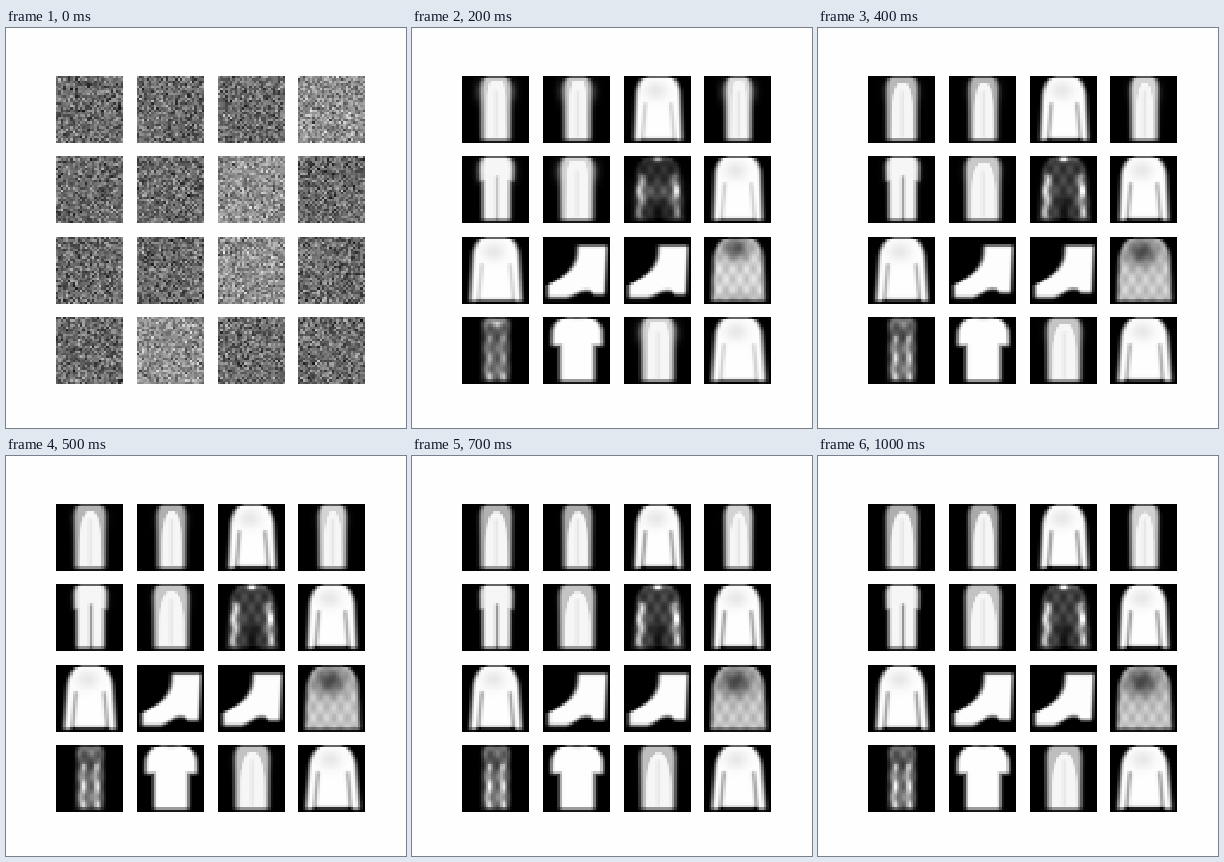
An HTML page with a canvas that plays this animation: 400x400 px, repeating every 1100 ms.

```html
<!DOCTYPE html>
<html lang="en">
<head>
<meta charset="utf-8">
<title>Garment grid</title>
<style>
html, body { margin: 0; width: 100%; height: 100%; overflow: hidden; background: #fefefe; }
canvas { display: block; width: 400px; height: 400px; }
</style>
</head>
<body>
<canvas id="stage" width="400" height="400"></canvas>
<script>
const N = 28, SIZE = 67, PITCH = 80.6, LEFT = 50, TOP = 47.6;
const STEP = 100, STEPS = 11;
const ctx = document.getElementById('stage').getContext('2d');
const tile = document.createElement('canvas');
tile.width = tile.height = N;
const tctx = tile.getContext('2d');
const img = tctx.createImageData(N, N);
const grid = new Float32Array(N * N);
let u = 0; // 0: first rough shapes, 1: settled shapes

const clamp = (v, a, b) => Math.max(a, Math.min(b, v));
const smooth = v => { v = clamp(v, 0, 1); return v * v * (3 - 2 * v); };
const ease = (a, b) => a + (b - a) * u;
const edge = (d, soft) => smooth(d / soft + 0.5);

function random(seed) {
  return () => {
    seed = (seed + 0x6D2B79F5) | 0;
    let t = Math.imul(seed ^ (seed >>> 15), 1 | seed);
    t = (t + Math.imul(t ^ (t >>> 7), 61 | t)) ^ t;
    return ((t ^ (t >>> 14)) >>> 0) / 4294967296;
  };
}

function paint(f) {
  for (let y = 0; y < N; y++)
    for (let x = 0; x < N; x++) {
      const i = y * N + x;
      grid[i] = f(x + 0.5, y + 0.5, grid[i]);
    }
}

const softness = () => ease(4, 3.2);

// Upright shape around x = c: round shoulders, then straight sides to the hem.
function cloth(c, { neck, side, hem, round, level, top = 0.6, end = 26.7 }) {
  paint((x, y, v) => {
    const t = clamp((y - top) / round, 0, 1);
    const full = side + (hem - side) * clamp(y / N, 0, 1);
    const half = neck + (full - neck) * Math.sqrt(1 - (1 - t) ** 2);
    const cover = edge(half - Math.abs(x - c), softness()) * edge(y - top, 1.6) * edge(end - y, 2.6);
    return Math.max(v, level * cover);
  });
}

function spot(x0, y0, rx, ry, level) {
  paint((x, y, v) => v + level * Math.exp(-(((x - x0) / rx) ** 2) - ((y - y0) / ry) ** 2));
}

function line(x0, y0, x1, y1, w, level) {
  const dx = x1 - x0, dy = y1 - y0;
  paint((x, y, v) => {
    const k = clamp(((x - x0) * dx + (y - y0) * dy) / (dx * dx + dy * dy), 0, 1);
    const d = Math.hypot(x - x0 - k * dx, y - y0 - k * dy) / w;
    return v + level * Math.exp(-d * d);
  });
}

function pair(f, c, gap) {
  f(c - gap, -1);
  f(c + gap, 1);
}

function mottle(phase, amount) {
  paint((x, y, v) => v * (1 + amount * Math.sin(x * 1.1 + phase) * Math.sin(y * 0.7 + phase * 2)));
}

function halo(c, gap) {
  pair(x => spot(x, 6.5, 2, 4.5, 60 * (1 - u)), c, gap);
}

// Grey outer cloth with a bright arched core.
function dress(c, w, grey) {
  const half = w - 0.8 * (1 - u);
  cloth(c, { neck: half - 2, side: half, hem: half - 0.2, round: 5, level: ease(225, grey) });
  cloth(c + 0.2, { neck: ease(half - 2, 1), side: half - 1.3, hem: half - 1, round: ease(4, 14), level: 246, top: ease(0.6, 3) });
  line(c, 7, c, 25, 0.8, -16);
  halo(c, w + 0.6);
}

function trousers(c) {
  cloth(c, { neck: 5, side: 5.9, hem: 5.8, round: 3, level: 246 });
  cloth(c, { neck: 5, side: 7, hem: 6.4, round: 4, level: 235, end: 11 });
  line(c + 0.2, 9, c + 0.2, 26, 0.8, ease(-15, -100));
  halo(c, 7.4);
}

function sweater(c, shoulder, hem) {
  const w = shoulder - 0.5 * u, gap = hem * 0.64;
  cloth(c, { neck: ease(6, 4), side: w, hem, round: ease(6, 9), level: 254 });
  pair((x, s) => line(x - s, 12, x + s * 0.3, 27, 0.9, ease(-8, -90)), c, gap);
  line(c - gap + 1, 27.3, c + gap - 1, 27.3, 1.4, -170 * u);
  spot(c - 1, 6, 5, 4, -22);
}

function boot() {
  paint((x, y) => {
    const left = ease(14.2, 14.6) - 12.4 * clamp((y - 3) / 17, 0, 1) ** 3;
    const right = 26.8 - y * 0.04;
    const sole = 25.4 - ease(2.2, 4) * smooth((x - 9) / 9) + 1.6 * smooth((x - 19) / 3);
    return 253 * edge(x - left, 3.4) * edge(right - x, 2.4) * edge(y - 3.6, 2.4) * edge(sole - y, 3);
  });
}

function darkCoat(c) {
  const late = 1 - (1 - u) ** 2;
  cloth(c, { neck: 4, side: 8.4, hem: 11, round: 6, level: 62 * late });
  pair((x, s) => {
    line(x, 9, x + s * 0.7, 25, 1.6, 115 * late);
    spot(x, 14.5, 2, 4, 110 * (1 - late) + 50 * late);
  }, c, 7.2);
  spot(c, 15.5, 8.5, 4.5, 125 * (1 - late));
  spot(c, 1.3, 3, 1, 150 * late);
  line(c, 19, c, 27, 2.5, -40 * late);
  mottle(2, 0.3);
}

function shadedCoat(c) {
  cloth(c, { neck: 5, side: ease(9.6, 10.4), hem: ease(11, 11.6), round: 9, level: ease(222, 195) });
  spot(c - 1, ease(3, 7), ease(5, 7), ease(4, 6), -125);
  spot(c, 26, 10, 3, -60 * (1 - u));
  mottle(4, 0.1);
}

function dimDress(c) {
  cloth(c, { neck: 4.5, side: 5.6, hem: 5.6, round: 3, level: ease(95, 115) });
  spot(c, 2.5, 3.8, 1.4, 150 * (1 - u));
  pair((x, s) => {
    spot(x, 24.5, 1.5, 1.8, 80 * (1 - u));
    line(x, 9, x + s * 0.5, 25, 1.1, 95 * u);
  }, c, 2.6);
  spot(c - 1, 8, 4, 5, -45 * u);
  mottle(1, 0.25);
}

function tshirt(c) {
  cloth(c, { neck: 5, side: 7.2, hem: 7.2, round: 3, level: 254 });
  cloth(c, { neck: 5, side: ease(10, 10.7), hem: 11.2, round: ease(5, 7), level: 254, end: 12 });
  spot(c, 0.6, 2.5, 0.8, -50 * u);
}

const cells = [
  () => dress(14.2, 6.8, 175),
  () => dress(14.4, 6.3, 170),
  () => sweater(14.3, 9.1, 10.1),
  () => dress(14.4, 6, 210),
  () => trousers(14.4),
  () => dress(14.2, 7.5, 195),
  () => darkCoat(14.4),
  () => sweater(14.2, 9.5, 10.4),
  () => sweater(14.2, 9.4, 11),
  boot,
  boot,
  () => shadedCoat(14.4),
  () => dimDress(14.2),
  () => tshirt(14.3),
  () => dress(14.2, 7.4, 190),
  () => sweater(14.5, 9.5, 11.4)
];

function noise(i) {
  const r = random(900 + i * 37);
  const mean = [3, 6, 10, 13].includes(i) ? 142 : 107;
  paint((x, y) => {
    const weave = (x & 1) === (y & 1) ? 8 : -8;
    return mean + weave + (r() + r() + r() - 1.5) * 62;
  });
}

function draw(step) {
  ctx.fillStyle = '#fefefe';
  ctx.fillRect(0, 0, 400, 400);
  ctx.imageSmoothingEnabled = false;
  u = 1 - Math.exp(-(step - 1) / 1.8);
  cells.forEach((cell, i) => {
    grid.fill(0);
    if (step) cell(); else noise(i);
    grid.forEach((v, k) => {
      img.data.fill(clamp(Math.round(v), 0, 254), k * 4, k * 4 + 3);
      img.data[k * 4 + 3] = 255;
    });
    tctx.putImageData(img, 0, 0);
    const x = Math.round(LEFT + PITCH * (i % 4) + 0.3), y = Math.round(TOP + PITCH * (i >> 2));
    ctx.drawImage(tile, x, y, SIZE, SIZE);
  });
}

let shown = -1;
const start = performance.now();
function tick() {
  const step = Math.floor((performance.now() - start) / STEP) % STEPS;
  if (step !== shown) draw(shown = step);
  requestAnimationFrame(tick);
}
tick();
</script>
</body>
</html>
```
